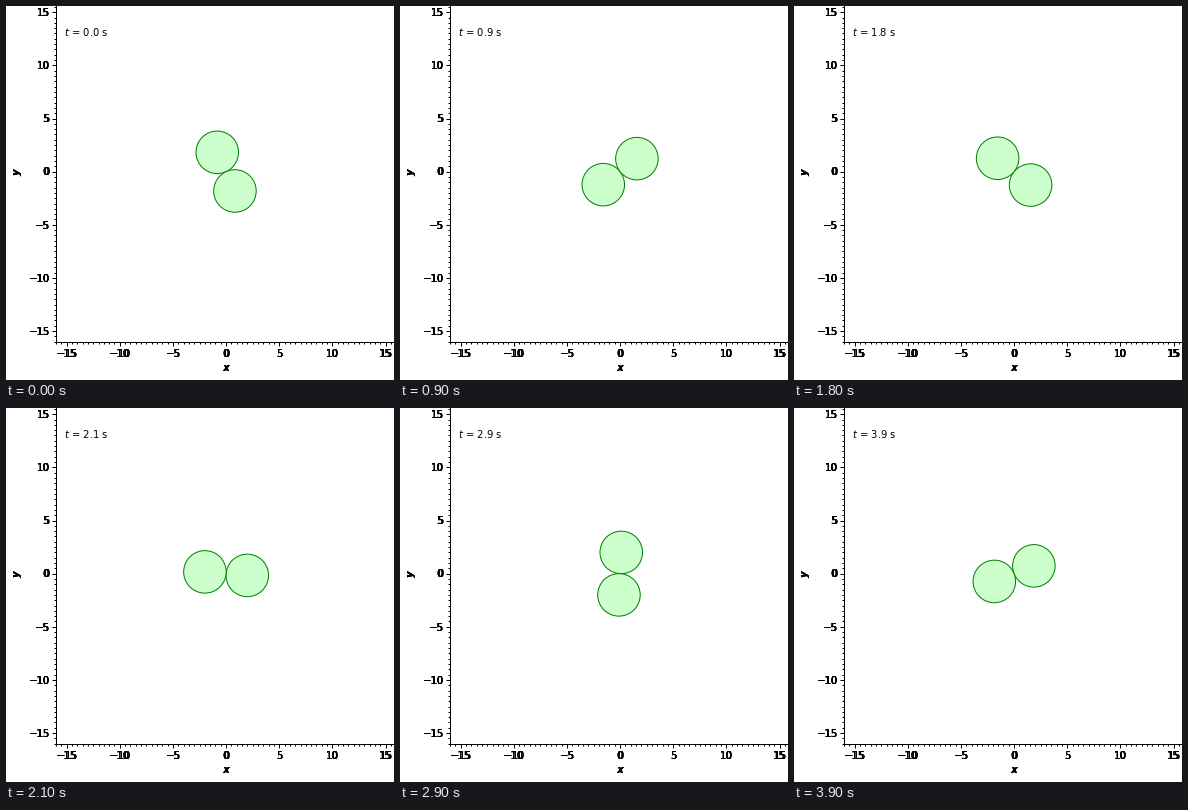
A matplotlib script that plays this animation: 388 by 374 pixels, repeating every 4000 ms.

```python
import numpy as np
import matplotlib.pyplot as plt
from matplotlib.animation import FuncAnimation
from matplotlib.lines import TICKDOWN, TICKLEFT
from matplotlib.patches import Circle

W, H, DPI = 388, 374, 64
PT = 72 / DPI              # points per pixel
SCALE = 10.63              # pixels per unit
X0, Y0 = 220.1, 165.65     # pixel position of the plot's origin
LOW = -16                  # where both axes start
RADIUS = 2
OMEGA = 2                  # rad/s
PHASE = 2                  # rad
FRAMES, STEP = 40, 100

plt.rcParams["font.family"] = "DejaVu Sans"
plt.rcParams["mathtext.fontset"] = "dejavusans"

fig = plt.figure(figsize=(W / DPI, H / DPI), dpi=DPI, facecolor="white")
ax = fig.add_axes([0, 0, 1, 1])
ax.set_xlim(0, W)
ax.set_ylim(H, 0)
ax.axis("off")


def px(x):
    return X0 + SCALE * x


def py(y):
    return Y0 - SCALE * y


def write(x, y, text, **kw):
    return ax.text(x, y, text, fontsize=10 * PT, color="black", **kw)


def label(x, y, text, repeats=3, **kw):
    """Overprint plain and math text, which gives heavy, uneven strokes."""
    for _ in range(repeats):
        write(x, y, text, **kw)
        write(x, y, f"${text}$", **kw)


def ticks(xs, ys, marker, size):
    ax.plot(xs, ys, ls="none", marker=marker, ms=size * PT,
            mew=PT, color="black")


def draw_axes():
    left, bottom = px(LOW), py(LOW)
    ax.plot([left, W], [bottom, bottom], color="black", lw=PT)
    ax.plot([left, left], [0, bottom], color="black", lw=PT)

    major = np.arange(-15, 16, 5)
    minor = np.arange(LOW, 16, 0.5)
    for values, size in ((major, 4), (minor, 2)):
        ticks(px(values), np.full(len(values), bottom), TICKDOWN, size)
        ticks(np.full(len(values), left), py(values), TICKLEFT, size)

    for v in major:
        text = str(v).replace("-", "\u2212")
        label(px(v), 351, text, ha="center", va="baseline")
        label(44, py(v) + 3.7, text, ha="right", va="baseline")
    name = dict(ha="center", va="center", style="italic")
    label(219.8, 362.3, "x", **name)
    label(11.7, 166.2, "y", rotation=90, **name)


draw_axes()
clock = write(58, 30, "", ha="left", va="baseline")
discs = [ax.add_patch(Circle((0, 0), RADIUS * SCALE, facecolor="#ccffcc",
                             edgecolor="#008000", lw=PT, zorder=3))
         for _ in range(2)]


def update(i):
    t = i * STEP / 1000
    angle = OMEGA * t + PHASE
    for disc, a in zip(discs, (angle, angle + np.pi)):
        disc.center = px(RADIUS * np.cos(a)), py(RADIUS * np.sin(a))
    clock.set_text(f"$t$ = {t:.1f} s")
    return [*discs, clock]


anim = FuncAnimation(fig, update, frames=FRAMES, interval=STEP,
                     repeat=True, repeat_delay=0, blit=False)
plt.show()
```
